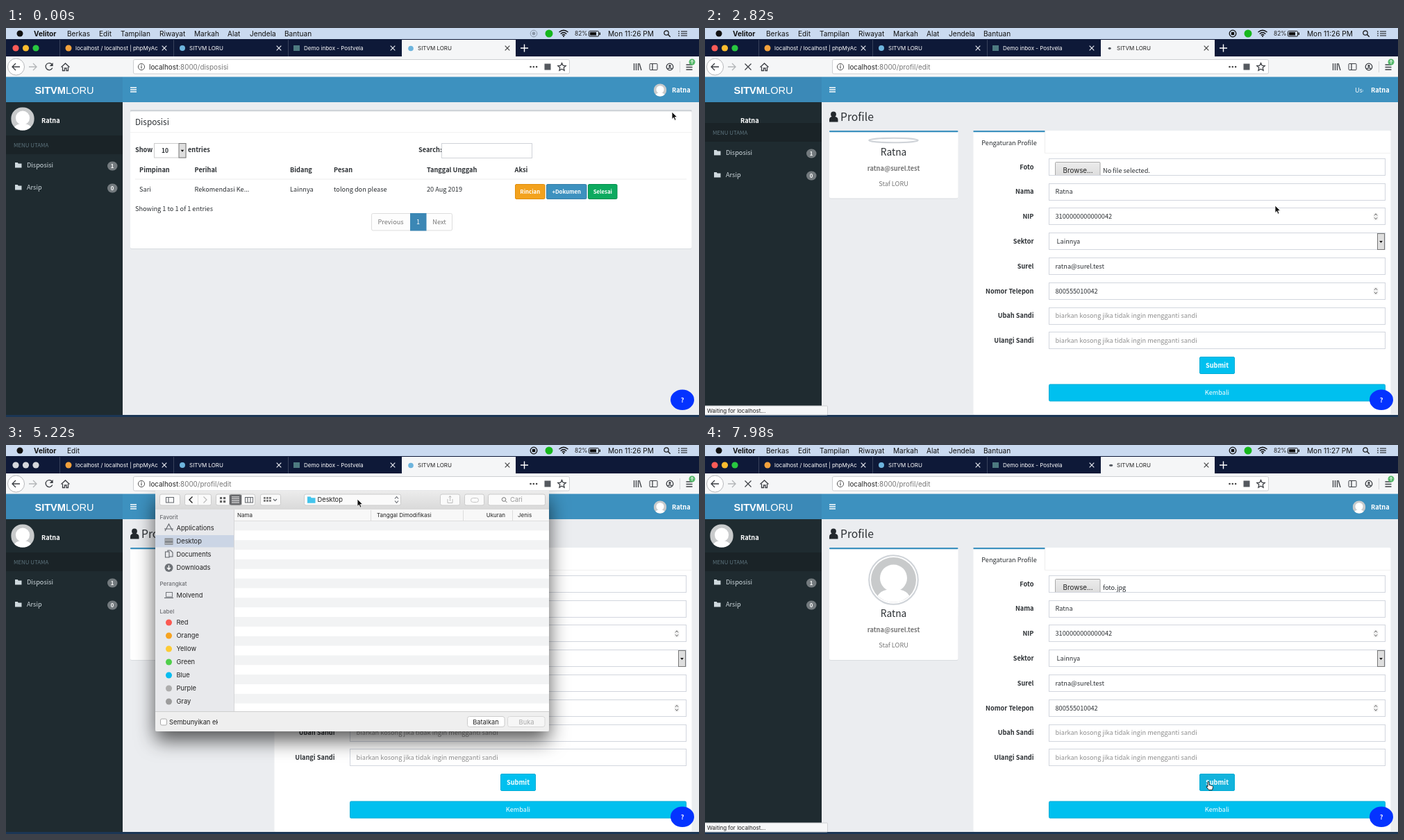
An HTML page for the animation above (8 s loop, 998 px wide and 561 px high).

```html
<!DOCTYPE html>
<html lang="id">
<head>
<meta charset="utf-8">
<title>Profile</title>
<style>
html, body { margin: 0; width: 100%; height: 100%; overflow: hidden; background: #ebedf0; }
svg { display: block; width: 100%; height: 100%; }
text { white-space: pre; }
.p { font: 9.2px "Noto Sans CJK JP", "Noto Sans CJK SC", "Noto Sans CJK", "Noto Sans", sans-serif; fill: #2b2f33; }
.u { font: 8px Inter, sans-serif; fill: #222; }
.d { font-size: 9.3px; }
.m { font-size: 10.1px; fill: #111; }
.url { font-size: 9.9px; }
.b { font-weight: 700; }
.small { font-size: 7.8px; }
.mid { text-anchor: middle; }
.end { text-anchor: end; }
.w { fill: #fff; }
.g { fill: #777; }
.side { fill: #cfd9de; }
.icon { fill: none; stroke: #3c3f44; stroke-width: 1.3; }
</style>
</head>
<body>
<script>
const DURATION = 8000;
const BLUE = '#3d91bf', CYAN = '#00c0ef', SIDE = '#1f2b30';
const USER = 'Ratna', APP = 'SITVM LORU', MAIL = 'ratna@surel.test';

const rect = (x, y, w, h, fill, extra = '') =>
  `<rect x="${x}" y="${y}" width="${w}" height="${h}" fill="${fill}" ${extra}/>`;
const frame = (x, y, w, h, fill = '#fff', stroke = '#d2d6de', r = 0) =>
  rect(x + .5, y + .5, w - 1, h - 1, fill, `stroke="${stroke}" rx="${r}"`);
const circle = (x, y, r, fill, extra = '') =>
  `<circle cx="${x}" cy="${y}" r="${r}" fill="${fill}" ${extra}/>`;
const path = (d, extra = 'class="icon"') => `<path d="${d}" ${extra}/>`;
const text = (x, y, cls, str, extra = '') =>
  `<text x="${x}" y="${y}" dy=".36em" class="${cls}" ${extra}>${str}</text>`;
const group = (id, ...parts) => `<g id="${id}">${parts.join('')}</g>`;
const avatar = (x, y, r) =>
  `<use href="#avatar" x="${x - r}" y="${y - r}" width="${2 * r}" height="${2 * r}"/>`;
const each = (list, draw) => list.map(draw).join('');
const closeX = (x, y, r, stroke) =>
  path(`M${x - r} ${y - r}l${2 * r} ${2 * r}m0 ${-2 * r}l${-2 * r} ${2 * r}`, `fill="none" stroke="${stroke}" stroke-width="1.2"`);
const button = (x, y, w, h, fill, label, cls = '', edge = fill) =>
  frame(x, y, w, h, fill, edge, 1.5) + text(x + w / 2, y + h / 2, `p w mid ${cls}`, label);
const arrowBox = (x, y, h) =>
  frame(x, y, 11, h, '#dedede', '#777') + path(`M${x + 3.2} ${y + h / 2 - 1}h4.6l-2.3 3z`, 'fill="#111"');
const folder = (x, y, fill, s = 1) =>
  path(`M${x} ${y}h${4 * s}l${s} ${1.5 * s}h${5 * s}v${6.5 * s}h${-10 * s}z`, `fill="${fill}"`);

const defs = `<defs>
  <symbol id="avatar" viewBox="-10 -10 20 20">
    <circle r="10" fill="#c8cacb"/><circle cy="-.8" r="6" fill="#fff"/>
    <path d="M-7 7.1Q-6 5-3 4.4H3Q6 5 7 7.1A10 10 0 0 1-7 7.1" fill="#fff"/>
  </symbol>
  <linearGradient id="bar" x2="0" y2="1"><stop stop-color="#ececec"/><stop offset="1" stop-color="#d9d9d9"/></linearGradient>
  <clipPath id="alt"><rect x="930" y="80" width="18" height="18"/></clipPath>
  <clipPath id="hide"><rect x="230" y="390" width="75" height="18"/></clipPath>
  <clipPath id="file"><rect x="496" y="189" width="483" height="23"/></clipPath>
  <clipPath id="under"><rect y="66" width="998" height="495"/></clipPath>
  <filter id="shadow" x="-20%" y="-20%" width="140%" height="150%"><feDropShadow dx="0" dy="13" stdDeviation="14" flood-opacity=".65"/></filter>
</defs>`;

function menuBar() {
  const items = [['Berkas', 88], ['Edit', 134], ['Tampilan', 165], ['Riwayat', 221], ['Markah', 271],
    ['Alat', 319], ['Jendela', 351], ['Bantuan', 401]];
  return rect(0, 0, 998, 16, '#cadaf0') + circle(20, 8, 4.5, '#111')
    + text(40, 8, 'u m b', 'Velitor')
    + group('menus', each(items, ([s, x]) => text(x, 8, 'u m', s)))
    + group('modalMenu', text(88, 8, 'u m', 'Edit'))
    + group('recIdle', circle(760, 8, 4.8, 'none', 'stroke="#8b97a8"'), circle(760, 8, 2.4, '#8b97a8'))
    + group('recOn', circle(760, 8, 4.8, 'none', 'stroke="#111" stroke-width="1.3"'), rect(757.8, 5.8, 4.4, 4.4, '#111'))
    + circle(782, 8, 5.5, '#16b71c')
    + path('M796.5 6q6.5-5.5 13 0M798.7 8.4q4.3-3.8 8.6 0M800.8 10.6q2.2-2 4.4 0', 'fill="none" stroke="#111" stroke-width="1.4"')
    + circle(803, 12, 1, '#111') + text(819, 8, 'u', '82%', 'style="font-size:8.4px"')
    + frame(839, 4, 15, 8.5, 'none', '#111', 1) + rect(841, 6, 9, 4.5, '#111') + rect(854.5, 6.5, 1.5, 3.5, '#111')
    + text(867, 8, 'u m', '', 'id="clock"')
    + circle(951, 7, 3.2, 'none', 'stroke="#111" stroke-width="1.2"') + path('M953.3 9.3l3.4 3.4', 'stroke="#111" stroke-width="1.3"')
    + path('M968 5h2m2 0h9M968 8h2m2 0h9M968 11h2m2 0h9', 'stroke="#111" stroke-width="1.2"');
}

function tabs() {
  const lights = colors => each(colors, (c, i) => circle(14 + 14.5 * i, 29, 4.6, c));
  const list = [['localhost / localhost | phpMyAc', 100, 228], [APP, 264, 393], ['Demo inbox - Postvela', 429, 557]];
  return rect(0, 16, 998, 26, '#0e1938')
    + group('lightsOn', lights(['#fc5b57', '#fdbc2e', '#28c840']))
    + group('lightsOff', lights(['#d6d8dc', '#d6d8dc', '#d6d8dc']))
    + each([77, 241, 406], x => rect(x, 17, 1, 24, '#39425c'))
    + each(list, ([s, x, c]) => text(x, 29.3, 'u w', s) + closeX(c, 29, 3.3, '#e8eaf0'))
    + circle(90, 29, 4.5, '#f2a13c') + circle(254, 29, 4, '#6db4dd') + rect(414, 25, 9, 8, '#4d7a80')
    + rect(570, 17, 164, 25, '#f5f6f7')
    + group('favicon', circle(583, 29.5, 3.8, '#6db4dd'))
    + '<ellipse id="spinner" cy="29.3" ry="1.6" fill="#555a62"/>'
    + text(593, 29.3, 'u', APP) + closeX(722, 29, 3.3, '#444')
    + path('M741 29h11m-5.5-5.5v11', 'stroke="#fff" stroke-width="1.4"');
}

function toolbar() {
  return rect(0, 41, 998, 29.5, '#f5f6f7')
    + circle(14.5, 56, 12, '#fff', 'stroke="#b5b7ba"')
    + path('M20 56h-11m5-5l-5 5 5 5') + path('M33 56h11m-5-5l5 5-5 5', 'fill="none" stroke="#b4b6b9" stroke-width="1.3"')
    + group('reload', path('M66.5 53a5 5 0 1 0 .3 4.5'), path('M67.7 50v5h-5z', 'fill="#3c3f44"'))
    + group('stop', closeX(62, 56, 4.5, '#3c3f44'))
    + path('M79.5 56.5l6-5.5 6 5.5M81.5 56v5.5h3v-3.5h2.5v3.5h2.5v-5.5')
    + frame(183, 45, 629, 21.5, '#fff', '#cdcfd2', 2)
    + circle(195, 56, 4.6, 'none', 'stroke="#555"') + path('M195 55v3.5m0-5.5v1.2', 'stroke="#555" stroke-width="1.2"')
    + text(206, 56, 'u url', 'localhost<tspan fill="#777">:8000</tspan><tspan id="route" fill="#777"></tspan>')
    + each([755.5, 759.8, 764.1], x => circle(x, 56, 1.3, '#444')) + rect(775.5, 51.5, 9, 9, '#55595f')
    + path('M800.5 50.5l1.7 3.7 4 .4-3 2.7.9 4-3.6-2-3.6 2 .9-4-3-2.7 4-.4z')
    + path('M904.5 51v10m3-10v10m3-10v10m1.5-10l3 10') + frame(926.5, 51, 12, 10, 'none', '#3c3f44', 1) + path('M931 51v10')
    + circle(956, 56, 4.8, 'none', 'class="icon"') + circle(956, 54.7, 1.7, '#3c3f44') + path('M953 59q3-3 6 0')
    + rect(970, 48, 1, 16, '#d5d6d8') + path('M979.5 53h9m-9 3.5h9m-9 3.5h9')
    + circle(988, 49, 4.5, '#55b96a') + path('M988 51.5v-5m-2 2l2-2 2 2', 'fill="none" stroke="#fff"');
}

function shell() {
  const item = (y, label, n) => folder(13, y - 4, '#cfd9de', .95) + text(30, y, 'p side', label)
    + rect(146, y - 5.5, 14.5, 13, '#737a7e', 'rx="6.5"') + text(153, y + 1.2, 'p w b mid small', n);
  return rect(0, 70, 998, 491, '#ebedf0')
    + rect(0, 70, 168, 37, '#3b89b7') + rect(168, 70, 830, 37, BLUE)
    + text(84, 89.5, 'w mid', '<tspan font-weight="700">SITVM</tspan>LORU', 'style="font:14.6px \'Liberation Sans\',Arial,sans-serif"')
    + path('M179 86h9m-9 3h9m-9 3h9', 'stroke="#fff" stroke-width="1.7"')
    + text(959, 89.5, 'p w b', USER)
    + group('altText', text(936, 90, 'p w', 'User', 'clip-path="url(#alt)"'))
    + rect(0, 107, 168, 451, SIDE) + text(51, 134, 'p w b', USER)
    + group('avatars', avatar(942, 89.5, 9.3), avatar(24, 131, 16.8))
    + group('sideMenu', rect(0, 155, 168, 27, '#1a2327'), rect(0, 182, 168, 376, SIDE),
      text(11, 169, 'p', 'MENU UTAMA', 'style="font-size:7.9px;fill:#5d747e"'), item(198, 'Disposisi', 1), item(230, 'Arsip', 0));
}

function listPage() {
  const heads = [['Pimpinan', 192], ['Perihal', 271.5], ['Bidang', 409], ['Pesan', 472], ['Tanggal Unggah', 606], ['Aksi', 732.5]];
  const cells = ['Sari', 'Rekomendasi Ke...', 'Lainnya', 'tolong don please', '20 Aug 2019'];
  return group('list', rect(168, 107, 830, 451, '#ebedf0'),
    rect(179, 118, 808.5, 201, '#d9dce0', 'rx="2"'), rect(179, 120, 808.5, 198, '#fff', 'rx="2"'),
    rect(179, 118, 808.5, 2.2, '#cfd3d8', 'rx="1"'),
    text(186, 135.5, 'p', 'Disposisi', 'style="font-size:11.8px"'), rect(179, 150, 808, 1, '#f2f2f2'),
    text(186, 176, 'p b', 'Show'), frame(213, 166, 46.5, 21.5, '#fff', '#ccc'), text(229, 177, 'p mid', '10', 'style="font-size:8.5px;font-weight:700"'),
    arrowBox(248.5, 166, 21.5), text(262, 176, 'p b', 'entries'),
    text(594, 176, 'p b', 'Search:'), frame(627, 166, 131, 22, '#fff', '#d0d3d8'),
    each(heads, ([s, x]) => text(x, 205, 'p b', s)), rect(186, 217.5, 794, 1, '#eee'),
    each(cells, (s, i) => text(heads[i][1], 232.5, 'p', s)),
    button(733, 225, 43.5, 22, '#f3a21e', 'Rincian', 'small b', '#e08e0b'),
    button(778, 225, 58.5, 22, BLUE, '+Dokumen', 'small b', '#367fa9'),
    button(838, 225, 42.5, 22, '#0daa5f', 'Selesai', 'small b', '#008d4c'),
    text(186, 260.5, 'p', 'Showing 1 to 1 of 1 entries'),
    frame(526, 267, 117, 25.5, '#fdfdfd', '#ddd', 2), rect(582, 267, 23.5, 25.5, '#3b87b5'),
    text(554, 280, 'p g mid', 'Previous'), text(593.5, 280, 'p w mid', '1'), text(624, 280, 'p g mid', 'Next'));
}

function profilePage() {
  const rows = [['Foto', ''], ['Nama', USER], ['NIP', '3100000000000042'], ['Sektor', ' Lainnya'], ['Surel', MAIL],
    ['Nomor Telepon', '800555010042'], ['Ubah Sandi'], ['Ulangi Sandi']];
  const hint = 'biarkan kosong jika tidak ingin mengganti sandi';
  const field = ([label, value], i) => {
    const y = 200.3 + 35.8 * i;
    const spin = i === 2 || i === 5
      ? rect(962.5, y - 5.5, 7, 11, '#f1f1f1', 'rx="3"') + path(`M964 ${y - 1.5}l2-2.5 2 2.5m-4 3l2 2.5 2-2.5`, 'fill="none" stroke="#666"') : '';
    return text(473.5, y, 'p b end', label) + frame(495, Math.round(y - 12.5), 485, 25)
      + text(504.5, y, 'p', value ?? hint, value === undefined ? 'style="fill:#8f8f8f"' : '')
      + spin + (i === 3 ? arrowBox(968, Math.round(y - 12), 24) : '');
  };
  return group('profile', rect(168, 107, 830, 451, '#ebedf0'),
    circle(185, 124.5, 3.9, '#23282c'), path('M179 135.5v-3q0-4.5 4-4.5h4q4.5 0 4.5 4.5v3z', 'fill="#23282c"'),
    text(195, 128.5, 'p', 'Profile', 'style="font-size:15.7px"'),
    rect(179, 148, 185.5, 98, '#fff'),
    group('photo', circle(271.5, 194.5, 35.3, '#fff', 'stroke="#cfd3d8" stroke-width="2"'), avatar(271.5, 194.5, 32.5)),
    group('photoEmpty', '<ellipse cx="271.5" cy="162" rx="35.3" ry="3.3" fill="#fff" stroke="#cfd3d8" stroke-width="2"/>'),
    group('card', rect(179, 232, 185.5, 79, '#dadde1', 'rx="2"'), rect(179, 231.5, 185.5, 78.5, '#fff', 'rx="2"'),
      text(271.5, 243.5, 'p mid', USER, 'style="font-size:13.8px"'), text(271.5, 267, 'p g b mid', MAIL), text(271.5, 289, 'p g mid', 'Staf LORU')),
    rect(179, 148, 185.5, 2.2, BLUE, 'rx="1"'),
    rect(386.5, 148, 601, 409.5, '#fff', 'rx="2"'), rect(386.5, 148, 103, 2.2, BLUE),
    rect(489, 150, 1, 30, '#eee'), rect(489, 180, 498, 1, '#f1f1f1'), text(438, 166, 'p mid', 'Pengaturan Profile'),
    each(rows, field),
    `<g clip-path="url(#file)">${frame(504, 193, 65.5, 26, 'url(#bar)', '#aaa', 1)}</g>`,
    text(537, 205.5, 'u mid', 'Browse...', 'style="font-size:9.8px"'), text(573, 205.5, 'p', '', 'id="fileName"'),
    group('submit', button(712, 474, 51, 25, CYAN, 'Submit', 'b', '#00acd6')),
    group('submitHover', button(712, 474, 51, 25, '#12b3dc', 'Submit', 'b', '#00acd6')),
    button(495, 513.5, 485, 25, CYAN, 'Kembali', '', '#00acd6'));
}

function userMenu() {
  return group('userMenu', frame(794, 107, 204, 167, '#f9f9f9', '#d8dadd'), rect(795, 107, 203, 128, BLUE),
    avatar(896, 148, 33), text(896, 202, 'p w mid', USER, 'style="font-size:11.5px"'),
    frame(801, 242, 45, 25, '#f4f4f4', '#ddd'), text(823.5, 254.5, 'p mid', 'Profil'),
    frame(944, 242, 47, 25, '#f4f4f4', '#ddd'), text(967.5, 254.5, 'p mid', 'Keluar'));
}

function fileDialog() {
  const places = ['Applications', 'Desktop', 'Documents', 'Downloads'];
  const labels = [['Red', '#fb5a52'], ['Orange', '#f6a321'], ['Yellow', '#fdcb35'], ['Green', '#50cf4b'],
    ['Blue', '#08bdf0'], ['Purple', '#adadad'], ['Gray', '#9c9c9c']];
  const knob = (x, w, fill = '#fafafa') => frame(x, 70.5, w, 17, fill, '#cbcbcb', 2.5);
  const line = 'fill="none" stroke="#62666c" stroke-width="1.1"';
  const heading = (y, s) => text(221.5, y, 'u', s, 'style="fill:#6b6d71;font-weight:500"');
  return `<g clip-path="url(#under)"><g id="dialog">`
    + rect(215, 66, 567, 347, '#efefef', 'rx="3" filter="url(#shadow)"') + rect(215, 66, 567, 27, 'url(#bar)')
    + each([[221, 30], [257, 39], [302, 57], [366, 30], [429, 140], [625, 29], [660, 29], [694, 83]], ([x, w]) => knob(x, w))
    + knob(321, 19, '#68696c') + rect(276, 71, 1, 16, '#ddd')
    + frame(230, 75, 12, 8.5, 'none', '#62666c') + path('M234 75v8', line)
    + path('M268.5 74.5l-4.5 4.5 4.5 4.5', 'fill="none" stroke="#222" stroke-width="1.4"') + path('M284.5 74.5l4.5 4.5-4.5 4.5', 'fill="none" stroke="#bbb" stroke-width="1.2"')
    + each([308, 313], x => each([75, 80], y => rect(x, y, 3.2, 3.2, '#666')))
    + path('M325 75h11m-11 2.7h11m-11 2.7h11m-11 2.7h11', 'stroke="#fff"')
    + frame(344, 75, 12, 8.5, 'none', '#62666c') + path('M348 75v8m4-8v8', line)
    + each([371, 375, 379], x => each([75, 79], y => rect(x, y, 2.8, 2.8, '#777'))) + path('M385 78l2.5 2.5 2.5-2.5', line)
    + folder(434, 74.5, '#43c4ec', 1.15) + text(448.5, 79, 'u d', '', 'id="folderName"') + path('M560 77.5l2.5-3 2.5 3m-5 3l2.5 3 2.5-3', line)
    + path('M636 78v5.5h7v-5.5m-3.5 3v-7.5m-2 2l2-2 2 2', 'fill="none" stroke="#bbb"') + frame(669, 76, 12, 7, 'none', '#c5c5c5', 3)
    + circle(717, 78.5, 2.8, 'none', 'stroke="#777"') + path('M719 80.5l2.5 2.5', 'stroke="#777"') + text(726, 79, 'u d', 'Cari', 'style="fill:#999"')
    + rect(215, 93, 113, 291, '#e8e9ec') + rect(215, 130, 113, 17.5, '#cbd5e5', 'id="placeOn"')
    + heading(104, 'Favorit') + each(places, (s, i) => text(245.5, 120 + 19 * i, 'u d', s))
    + path('M229 124l5.5-10 5.5 10m-12-3h13', line) + rect(228.5, 134.5, 12, 9.5, '#85898e') + path('M229 137h11m-11 5h11', 'stroke="#cfd1d4"')
    + path('M229.5 154h5.5v8h-5.5zM233 154v-2h4l3 3v6h-5', line) + circle(234.5, 177, 6, '#6e7277') + path('M234.5 173.5v6m-2.5-2.5l2.5 2.5 2.5-2.5', 'fill="none" stroke="#fff" stroke-width="1.3"')
    + heading(200, 'Perangkat') + text(245.5, 217, 'u d', 'Molvend') + frame(230, 212, 10, 7.5, 'none', '#74787d') + path('M228 220.5h13', line)
    + heading(240, 'Label') + each(labels, ([s, c], i) => circle(234.5, 256 + 19 * i, 4.5, c) + text(245.5, 256 + 19 * i, 'u d', s))
    + rect(328, 93, 454, 291, '#fff') + rect(328, 93, 454, 16, '#f8f8f8')
    + each([...Array(10).keys()], i => rect(328, 109.5 + 27.7 * i, 454, 13.85, '#f2f3f4'))
    + each([525, 658, 729], x => rect(x, 94, 1, 15, '#dcdcdc')) + rect(328, 109, 454, 1, '#dedede') + rect(328, 93, 1, 291, '#d6d6d8')
    + text(333, 101, 'u', 'Nama') + text(534, 101, 'u', 'Tanggal Dimodifikasi') + text(719, 101, 'u end', 'Ukuran') + text(737, 101, 'u', 'Jenis')
    + group('fileRow', rect(328, 110, 454, 13.5, '#2a6fdc'), rect(334, 113, 8, 7.5, '#dfe6ee'), text(347, 117, 'u w', 'foto.jpg'))
    + rect(215, 384, 567, 1, '#cfcfcf') + frame(222, 394.5, 10, 10, '#fff', '#aaa', 2)
    + `<g clip-path="url(#hide)">${text(235, 399.5, 'u d', 'Sembunyikan ekstensi')}</g>`
    + frame(664, 391, 54.5, 16, '#fff', '#ccc', 3) + text(691, 399.5, 'u d mid', 'Batalkan')
    + frame(722, 391, 54.5, 16, '#f6f6f6', '#d8d8d8', 3) + text(749.5, 399.5, 'u d mid', 'Buka', 'style="fill:#aaa"')
    + '</g></g>';
}

const overlay = rect(0, 558, 998, 3, '#1b3655')
  + '<ellipse cx="974" cy="536.3" rx="17" ry="14.8" fill="#0433ff"/>' + text(974, 536.5, 'p w b mid', '?')
  + group('status', frame(-1, 544.5, 178, 14, '#f6f7f8', '#cfd1d4', 1), text(3, 552, 'u', '', 'id="statusText"'))
  + group('arrow', path('M0 0v10.5l2.4-2.2 1.7 3.9 1.9-.8-1.7-3.8h3.3z', 'fill="#111" stroke="#fff" stroke-width=".8"'))
  + group('hand', path('M-1 0q1.3-1 2 .3v4l4.5 1.2q1.3.5 1 2.2l-.9 3.8h-5l-3.7-4.7q.7-1.3 2.1 0z', 'fill="#fff" stroke="#111" stroke-width=".9"'));

document.body.innerHTML = `<svg viewBox="0 0 998 561" preserveAspectRatio="none">${defs}${shell()}${listPage()}${profilePage()}`
  + `${userMenu()}${menuBar()}${tabs()}${toolbar()}${fileDialog()}${overlay}</svg>`;

const el = id => document.getElementById(id);
const show = (id, on) => el(id).setAttribute('display', on ? 'inline' : 'none');
const move = (id, x, y) => el(id).setAttribute('transform', `translate(${x} ${y})`);
const put = (id, s) => { if (el(id).textContent !== s) el(id).textContent = s; };

// time, x, y of the pointer tip
const pointer = [[0, 959, 121], [260, 962, 91], [480, 962, 91], [860, 868, 200], [1250, 821, 256], [3420, 821, 256],
  [4100, 527, 203], [4740, 527, 203], [5060, 506, 78], [5320, 506, 78], [5640, 470, 128], [5940, 397, 115],
  [6080, 385, 115], [6800, 385, 115], [7520, 725, 486], [8000, 725, 486]];

function pointerAt(t) {
  const i = pointer.findIndex(k => k[0] > t);
  const [t0, x0, y0] = pointer[i - 1], [t1, x1, y1] = pointer[i];
  const u = (t - t0) / (t1 - t0), e = u * u * (3 - 2 * u);
  return [x0 + (x1 - x0) * e, y0 + (y1 - y0) * e];
}

function render(t) {
  const between = (a, b) => t >= a && t < b;
  const loading = between(1740, 3060) || t >= 7740;
  const modal = between(4380, 6840);
  const onProfile = t >= 2460;
  const partial = between(2460, 3000);
  const hover = t >= 7440;

  show('recIdle', t < 240); show('recOn', t >= 240);
  show('menus', !modal); show('modalMenu', modal);
  show('lightsOn', !modal); show('lightsOff', modal);
  put('clock', t < 5520 ? 'Mon 11:26 PM' : 'Mon 11:27 PM');
  put('route', t < 1740 ? '/disposisi' : '/profil/edit');
  show('reload', !loading); show('stop', loading);
  show('favicon', !loading); show('spinner', loading);
  const swing = t / 1000 * Math.PI * 2;
  el('spinner').setAttribute('cx', 585 + 2.5 * Math.sin(swing));
  el('spinner').setAttribute('rx', 1.6 + 1.2 * Math.abs(Math.cos(swing)));

  show('list', !onProfile); show('profile', onProfile);
  show('avatars', !partial); show('altText', partial);
  show('photo', !partial); show('photoEmpty', partial);
  move('sideMenu', 0, partial ? -18 : 0);
  move('card', 0, partial ? -64.4 : 0);
  show('userMenu', between(420, 1760));
  put('fileName', t < 6780 ? 'No file selected.' : 'foto.jpg');
  show('submit', !hover); show('submitHover', hover);

  show('dialog', between(4860, 6780));
  move('dialog', 0, -350 * (1 - Math.min(1, Math.max(0, (t - 4860) / 160))));
  put('folderName', t < 5760 ? 'Desktop' : 'img copy');
  show('placeOn', t < 5760);
  show('fileRow', between(6180, 6780));

  show('status', loading || between(1200, 1740));
  put('statusText', loading ? 'Waiting for localhost...' : 'localhost:8000/profil/edit');
  const hand = between(220, 540) || between(1200, 1740) || hover;
  const [x, y] = pointerAt(t);
  show('hand', hand); show('arrow', !hand);
  move('hand', x, y); move('arrow', x, y);
}

const start = performance.now();
(function tick() {
  render((performance.now() - start) % DURATION);
  requestAnimationFrame(tick);
})();
</script>
</body>
</html>
```
